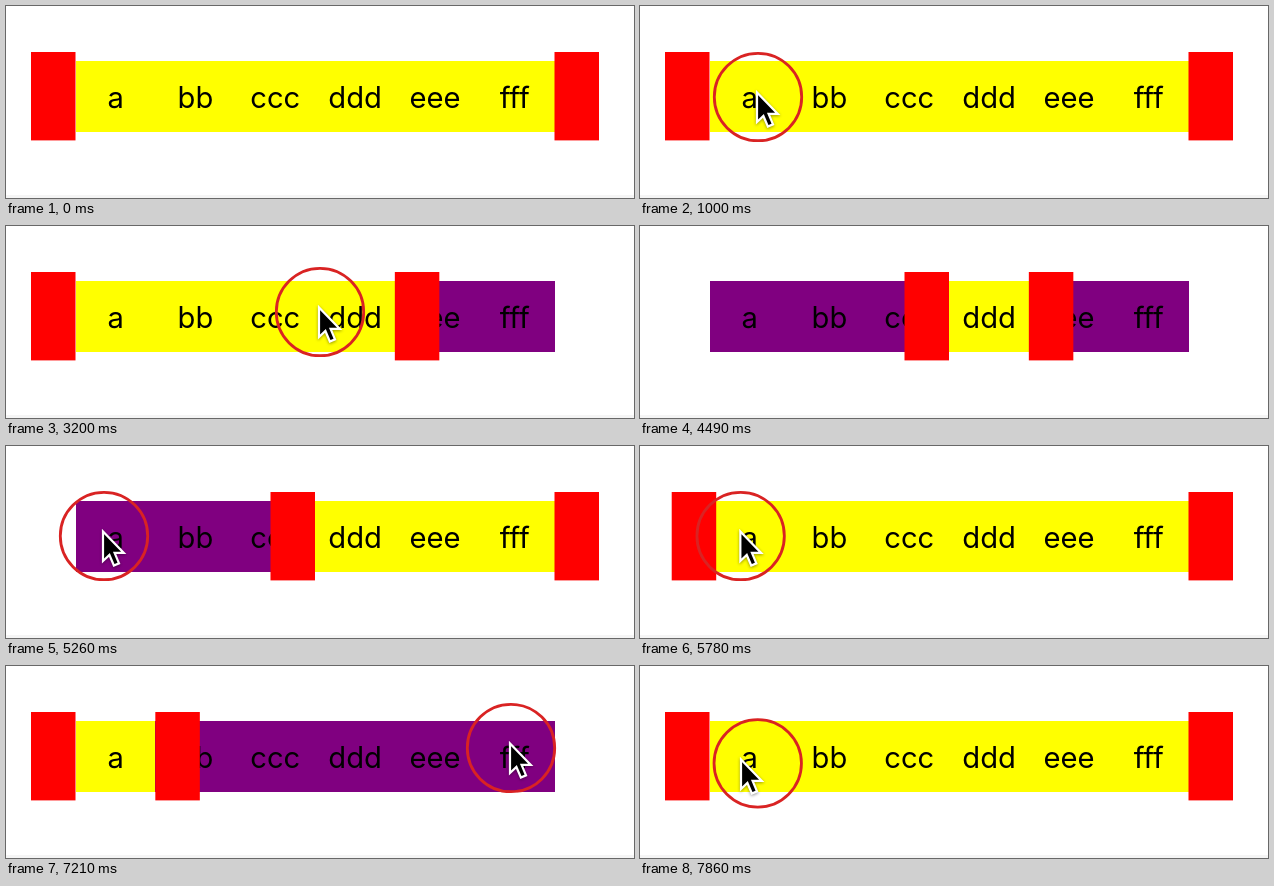
An HTML page that plays this animation: 628 px wide and 192 px high, repeating every 7990 ms.

```html
<!DOCTYPE html>
<html lang="en">
<head>
<meta charset="utf-8">
<title>Range selector</title>
<style>
  html, body { margin: 0; width: 628px; height: 192px; overflow: hidden; background: #fff; }
  svg { display: block; }
  text { font: 29.2px Inter, "Liberation Sans", sans-serif; text-anchor: middle; }
  .bar { y: 55px; height: 70.5px; shape-rendering: crispEdges; }
  .handle { y: 46px; width: 44.5px; height: 88.4px; fill: #f00; }
  #arrow { stroke: #fff; stroke-width: 2.2; filter: drop-shadow(0 1.5px 1.5px rgba(0, 0, 0, .4)); }
</style>
</head>
<body>
<svg width="628" height="192">
  <rect y="189" width="628" height="3" fill="#f5f5f5"/>
  <rect class="bar" x="69.5" width="479" fill="#800080"/>
  <rect class="bar" id="range" fill="#ff0"/>
  <g id="labels"></g>
  <rect class="handle" id="left"/>
  <rect class="handle" id="right"/>
  <g id="pointer">
    <circle id="ring" r="43.7" fill="none" stroke="#d92323" stroke-width="2.8"/>
    <path id="arrow" d="M0 0V29.5L6.4 23.5L10.9 34L16 31.8L11.6 21.4H20.8Z"/>
  </g>
</svg>
<script>
const LOOP = 7990, START = 217, STEP = 129.3, LAST = 59;
const LEFT = 69.5, CELL = 479 / 6, HANDLE = 44.5;
const LEAD = .135; // steps by which the arrow runs ahead of its ring
const $ = id => document.getElementById(id);
const edge = i => LEFT + i * CELL;

// A move is { at, to, steps }: it starts at a step and eases to a place.
const handleMove = (at, cell) => ({ at, to: [edge(cell)], steps: 3 });
const glide = (at, steps, x, y) => ({ at, to: [x, y], steps });

const leftMoves = [handleMove(24.6, 3), handleMove(40.3, 0)];
const rightMoves = [
  handleMove(6.6, 1), handleMove(16.6, 4), handleMove(33, 6),
  handleMove(46.66, 1), handleMove(55.5, 6)
];
const pointerMoves = [
  glide(0, 6, 118, 91), glide(12, 2, 115, 93), glide(15, 2, 314, 86),
  glide(23.2, 2, 349, 85), glide(30, 3, 502, 85), glide(37, 2, 98, 90),
  glide(42, 6, 133.7, 90), glide(51, 3, 505, 82), glide(58, 1 + LEAD, 102, 98)
];

function follow(moves, from, k) {
  return moves.reduce((place, { at, to, steps }) => {
    const t = Math.min(1, Math.max(0, (k - at) / steps));
    const ease = t * t * (3 - 2 * t);
    return place.map((v, i) => v + (to[i] - v) * ease);
  }, from);
}

function set(id, attrs) {
  for (const name in attrs) $(id).setAttribute(name, attrs[name]);
}

function draw(k) {
  const [l] = follow(leftMoves, [edge(0)], k);
  const [r] = follow(rightMoves, [edge(6)], k);
  set('left', { x: l - HANDLE });
  set('right', { x: r });
  set('range', { x: l, width: r - l });

  const pointerAt = step => follow(pointerMoves, [163, 128], step);
  const [x, y] = pointerAt(k), [ax, ay] = pointerAt(k + LEAD);
  const away = k < 0 || (k >= 32 && k < 34);
  set('pointer', { visibility: away ? 'hidden' : 'visible' });
  set('ring', { transform: `translate(${x} ${y})` });
  set('arrow', { transform: `translate(${ax - 1} ${ay - 4.5})` });
}

['a', 'bb', 'ccc', 'ddd', 'eee', 'fff'].forEach((word, i) => {
  const label = document.createElementNS('http://www.w3.org/2000/svg', 'text');
  label.setAttribute('x', edge(i + .5) + .2);
  label.setAttribute('y', 101.5);
  label.textContent = word;
  $('labels').append(label);
});

function frame() {
  const t = performance.now() % LOOP;
  draw(Math.min(LAST, Math.floor((t - START) / STEP)));
  requestAnimationFrame(frame);
}
frame();
</script>
</body>
</html>
```
